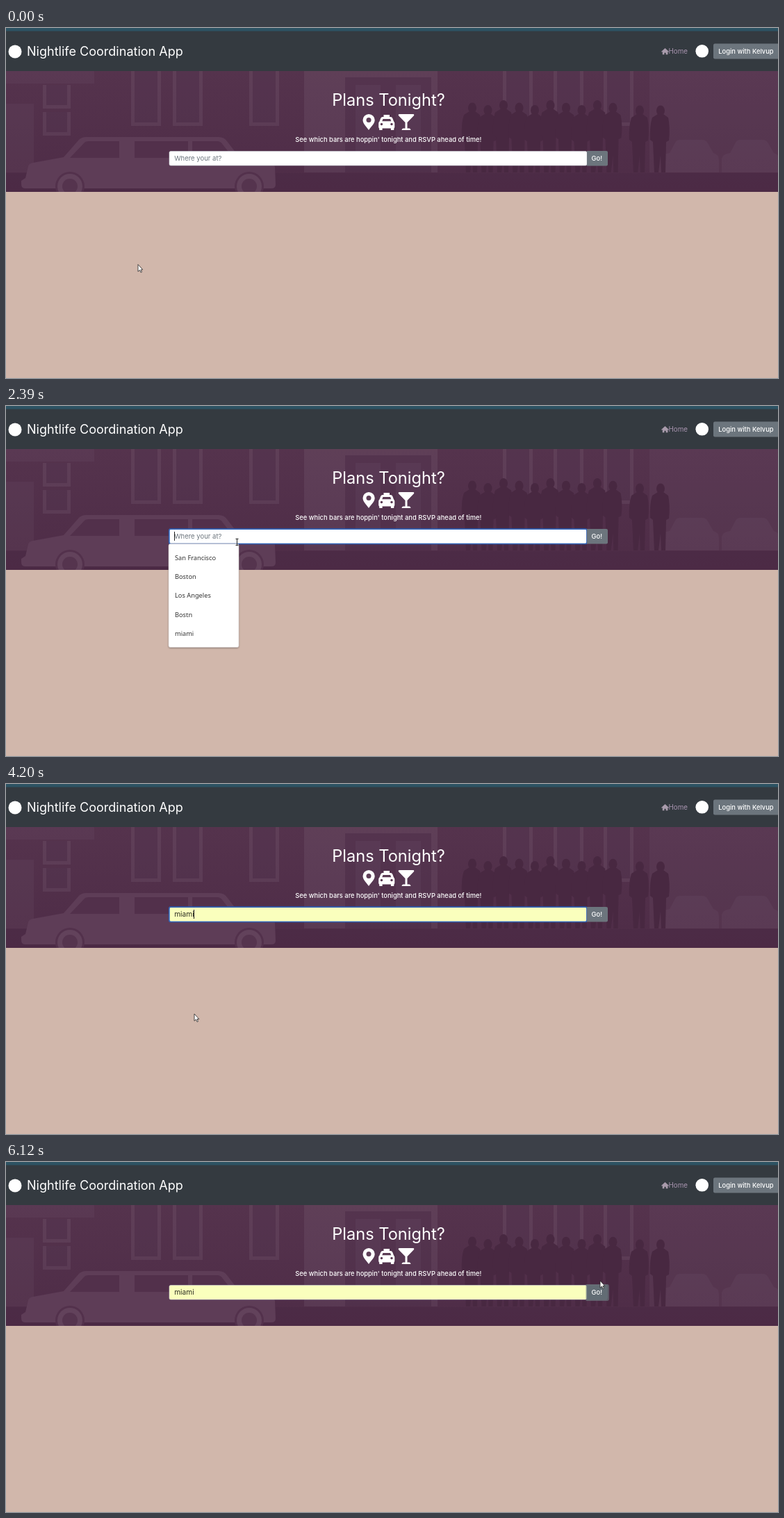
An HTML page that plays this animation: 1111 by 504 pixels, repeating every 8000 ms.

```html
<!DOCTYPE html>
<html lang="en">
<head>
<meta charset="utf-8">
<title>Nightlife Coordination App</title>
<style>
  html, body { margin: 0; width: 100%; height: 100%; overflow: hidden; background: #d1b7ab; }
  svg { display: block; width: 100%; height: 100%; }
  text { font-family: Inter, "Open Sans", sans-serif; font-size: 9.5px; fill: #fff; white-space: pre; }
  .medium { font-weight: 500; font-size: 9.35px; }
  .title { font-size: 18.05px; }
  .headline { font-size: 23.6px; text-anchor: middle; }
  .lead { text-anchor: middle; }
  .home { font-size: 9.8px; fill: #a894af; }
  .option { font: 9.25px "Noto Sans", "Open Sans", sans-serif; fill: #333; }
  .light { fill: #fff; fill-opacity: .06; }
  .faint { fill: #fff; fill-opacity: .03; }
  .dark { fill: #3d1d38; fill-opacity: .3; }
  .ground { fill: #3d1d38; fill-opacity: .12; }
  .limo { fill: #5e3d57; }
  .crowd { fill: #482841; }
</style>
</head>
<body>
<svg viewBox="0 0 1111 504" preserveAspectRatio="none">
  <defs>
    <linearGradient id="dusk" x2="0" y2="1">
      <stop offset="0" stop-color="#55334d"/>
      <stop offset="1" stop-color="#4e2c47"/>
    </linearGradient>
    <clipPath id="heroClip"><path d="M0 62H1111V236H0Z"/></clipPath>
    <filter id="shade" x="-10%" y="-10%" width="120%" height="120%">
      <feDropShadow dx="0" dy="1" stdDeviation="1.2" flood-opacity=".35"/>
    </filter>
  </defs>

  <path fill="#343a40" d="M0 0H1111V63H0Z"/>
  <path fill="#2d5363" d="M0 0H1111V4.5H0Z"/>

  <g clip-path="url(#heroClip)">
    <path fill="url(#dusk)" d="M0 62H1111V236H0Z"/>
    <path class="faint" d="M0 109H40V208H0ZM0 62H127V80H0ZM926 62H1111V208H926Z"/>
    <g id="windows"></g>
    <path class="light" d="M429 62H621V208H429Z"/>
    <path class="dark" d="M488 71H612V208H488Z"/>
    <path class="faint" d="M503 82h36v114h-36zM561 82h36v114h-36z"/>
    <g id="parked"></g>
    <g id="crowd" class="crowd"></g>
    <path class="ground" d="M0 209H1111V236H0Z"/>

    <path class="limo" d="M22 230V220l6-4 4-17q1-4 7-5l44-8 21-24q4-5 12-5H306q8 0 12 6l20 26 42 4q6 1 7 7l1 25q0 6-6 6H28q-6 0-6-6z"/>
    <path fill="#52304b" d="M92 187l20-21q2-3 7-3h44v24zM185 163h77v24h-77zM268 163h36q5 0 8 5l15 19h-59z"/>
    <g id="wheels"></g>
  </g>

  <circle cx="13" cy="34" r="9.5" fill="#fff"/>
  <text class="title" x="30" y="40">Nightlife Coordination App</text>
  <path fill="#a99bac" d="M943 34l5.500-5 5.500 5-.7.800-.9-.7v4.200h-2.700v-2.600h-2.300v2.600h-2.600v-4.200l-1 .7z"/>
  <text class="home" x="953.5" y="37">Home</text>
  <circle cx="1001.7" cy="33.3" r="9.3" fill="#fff"/>
  <rect x="1018" y="22.5" width="96" height="22" rx="2.2" fill="#6c757d"/>
  <text class="medium" x="1025.3" y="36.9">Login with Kelvup</text>

  <text class="headline" x="550.5" y="112">Plans Tonight?</text>
  <g fill="#fff">
    <path d="M522 147C519 142 513.5 138 513.5 132.5a8.6 8.6 0 0 1 17.2 0C530.7 138 525 142 522 147z"/>
    <path d="M543.5 125h8.500v3h1.500q2 0 2.800 2l1.700 4.500q1.300 1 1.300 2.800v5.700l-1 2v2h-4.400v-2.500h-12.300v2.500h-4.400v-2l-1-2v-5.700q0-1.800 1.300-2.800l1.700-4.500q.8-2 2.800-2h1.500z"/>
    <path d="M565.500 124h21q1.500 1 .4 2.300L577.500 136v8.500h3q2 .5 2 2.500h-13q0-2 2-2.500h3V136L565 126.300q-1-1.300.5-2.300z"/>
  </g>
  <circle cx="522" cy="132.600" r="3.500" fill="#5f3f58"/>
  <g fill="#5a3a53">
    <path d="M541.300 134.200l1.200-3.200h10.600l1.200 3.200z"/>
    <circle cx="540.500" cy="138.500" r="1.700"/>
    <circle cx="555" cy="138.500" r="1.700"/>
  </g>
  <text class="medium lead" x="550.3" y="164.4">See which bars are hoppin' tonight and RSVP ahead of time!</text>

  <rect id="field" x="235" y="177.500" width="601" height="20.500" rx="2" stroke="#ced4da" stroke-width=".6"/>
  <rect id="ring" x="234.800" y="177.200" width="601.200" height="21.300" rx="2.200" fill="none" stroke="#2f62b8" stroke-width="1.700"/>
  <path id="go" d="M836 177H864q2 0 2 2V196.500q0 2-2 2H836z"/>
  <path id="goRing" d="M835.500 177H865q2 0 2 2V197q0 2-2 2H835.500z" fill="none" stroke="#6c757d" stroke-opacity=".7" stroke-width="1.8"/>
  <text class="medium" x="842.6" y="190.7">Go!</text>
  <text id="entry" x="242.2" y="190.7"></text>
  <path id="squiggle" fill="none" stroke="#e5443a" stroke-width=".9"/>
  <rect id="caret" y="181" width="1" height="13" fill="#222"/>

  <g id="menu">
    <rect x="234" y="198.5" width="101" height="149" rx="2.5" fill="#fff" stroke="#c4bcbc" stroke-width=".5" filter="url(#shade)"/>
    <rect id="hover" x="234.3" width="100.4" height="27.3" fill="#eee"/>
  </g>

  <g id="cursor" fill="#fff" stroke="#222" stroke-width=".8">
    <path id="arrow" d="M.5.5V10.700L2.900 8.500 4.500 12 6 11.300 4.500 8H7.300z"/>
    <path id="beam" d="M-2-4.700H2M0-4.700V4.700M-2 4.700H2" stroke-width="1"/>
    <path id="hand" d="M-.9 7V.8q0-.9.900-.9t.9.900V4.500L5 5.500q1.500 0 1.500 1.500v2.500L5 12.500H-.5L-3.600 8.200q-.3-1.400 1-1.400z"/>
  </g>
</svg>

<script>
const $ = id => document.getElementById(id);
const LOOP = 8000;
const STEP = 76;
const BLINK = 505;
const ROW_TOP = 205, ROW = 27.3;
const FOCUS = 1380, CHOOSE = 4200, SPELLCHECK = 4280, PRESS = 5670;
const cities = ["San Francisco", "Boston", "Los Angeles", "Bostn", "miami"];

function add(parent, tag, attrs, text = "") {
  const el = document.createElementNS("http://www.w3.org/2000/svg", tag);
  for (const name in attrs) el.setAttribute(name, attrs[name]);
  el.textContent = text;
  return $(parent).appendChild(el);
}

function addWindow(x, y, width, height) {
  add("windows", "rect", { class: "light", x, y, width, height });
  add("windows", "rect", { class: "dark", x: x + 5, y, width: width - 10, height: height - 5 });
}

function addPerson(x, top) {
  add("crowd", "ellipse", { cx: x, cy: top, rx: 6, ry: 7.5 });
  add("crowd", "path", {
    d: `M${x - 4} ${top + 5}h8l7 5q3 14 1 33l-4 2-1 ${163 - top}h-6l-1-25-3 25h-6l-2-${163 - top}-4-3q-1-20 3-32z`
  });
}

// Street scene
for (const x of [180, 240, 350, 715, 788, 860]) addWindow(x, 62, 43, 79);
for (const y of [82, 121]) addWindow(53, y, 40, 34);
for (let i = 0; i < 10; i++) addPerson(671 + i * 22.5, 115 + 4 * Math.sin(i * 2.1));
for (const x of [912, 942]) addPerson(x, 119);
for (const x of [943, 1030]) {
  add("parked", "path", { class: "faint", d: `M${x} 208v-20q2-7 12-8l8-15q2-4 7-4h32q5 0 8 5l8 14q8 2 8 10v18z` });
}
for (const cx of [92, 350]) {
  add("wheels", "circle", { cx, cy: 228, r: 21, fill: "#53314c" });
  add("wheels", "circle", { cx, cy: 228, r: 18, fill: "#62425b" });
  add("wheels", "circle", { cx, cy: 228, r: 11, fill: "#55344e" });
}

cities.forEach((city, i) =>
  add("menu", "text", { class: "option", x: 243, y: 221.8 + i * ROW }, city));
$("squiggle").setAttribute("d", "M243 192.5" + "q1-1.6 2 0t2 0".repeat(7));

const path = [
  { t: 145, x: 189.5, y: 340 },
  { t: 910, x: 327, y: 190 },
  { t: 990, x: 327, y: 190 },
  { t: 1140, x: 332.5, y: 196 },
  { t: 3250, x: 332.5, y: 196 },
  { t: 3640, x: 281, y: 392 },
  { t: 3720, x: 276.5, y: 360 },
  { t: 4110, x: 270.5, y: 330.5 },
  { t: 4535, x: 270.5, y: 330.5 },
  { t: 5210, x: 875, y: 178 },
  { t: 5280, x: 868.5, y: 182 },
  { t: 5350, x: 862, y: 184 },
  { t: 5750, x: 848, y: 187 },
  { t: 5895, x: 848, y: 187 },
  { t: 6120, x: 854.5, y: 170.5 }
];
const ease = p => p * p * (3 - 2 * p);

function pointerAt(t) {
  const next = path.findIndex(key => key.t > t);
  if (next < 1) return next ? path.at(-1) : path[0];
  const a = path[next - 1], b = path[next];
  const steps = Math.round((b.t - a.t) / STEP);
  const p = ease(Math.floor((t - a.t) / (b.t - a.t) * steps + .1) / steps);
  return { x: a.x + (b.x - a.x) * p, y: a.y + (b.y - a.y) * p };
}

const show = (id, on) => $(id).style.display = on ? "" : "none";
const clamp = v => Math.min(1, Math.max(0, v));

function render(t) {
  const { x, y } = pointerAt(t);
  const inRow = x > 234 && x < 866 && y >= 177 && y < 198.5;
  const overGo = inRow && x >= 836;
  const chosen = t >= CHOOSE, pressed = t >= PRESS;
  const menuOpen = t >= FOCUS && !chosen;
  const row = menuOpen ? Math.floor((y - ROW_TOP) / ROW) : -1;
  const hovered = cities[row];
  const value = chosen ? "miami" : hovered;

  $("cursor").setAttribute("transform", `translate(${x} ${y})`);
  show("hand", overGo);
  show("beam", inRow && !overGo);
  show("arrow", !inRow);

  show("menu", menuOpen);
  show("hover", hovered);
  $("hover").setAttribute("y", ROW_TOP + Math.max(row, 0) * ROW);

  const entry = $("entry");
  entry.textContent = value || "Where your at?";
  entry.style.fill = value ? "#2b2b20" : "#6c757d";
  entry.style.fontSize = value ? "10.2px" : "";
  $("field").setAttribute("fill", value ? "#faffbd" : "#fff");

  $("ring").style.opacity = clamp((t - FOCUS + 75) / 150) - clamp((t - PRESS) / 150);
  const typing = t >= FOCUS && !pressed;
  const blinkStart = chosen ? CHOOSE - 50 : FOCUS;
  show("caret", typing && Math.floor((t - blinkStart) / BLINK) % 2 === 0);
  $("caret").setAttribute("x", chosen ? 270 : 242);
  show("squiggle", t >= SPELLCHECK && !pressed);

  $("go").setAttribute("fill", overGo ? "#5a6268" : pressed ? "#626c74" : "#6c757d");
  show("goRing", pressed);
}

const begin = performance.now();
function tick() {
  render((performance.now() - begin) % LOOP);
  requestAnimationFrame(tick);
}
tick();
</script>
</body>
</html>
```
